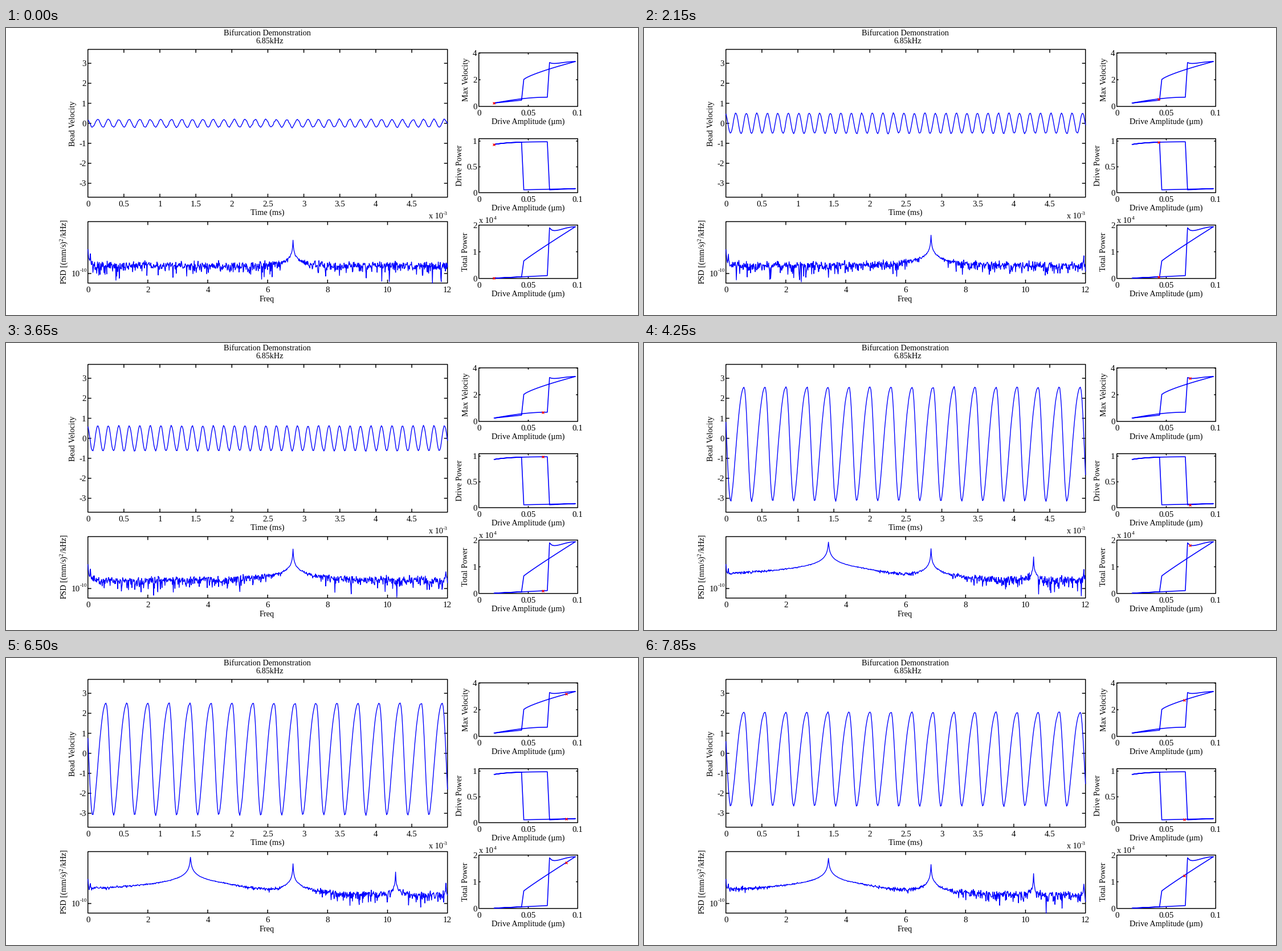
A matplotlib script for the animation above (8000 ms loop, 1109 by 505 pixels).

```python
import numpy as np
import matplotlib.pyplot as plt
from matplotlib.animation import FuncAnimation

W, H, DPI = 1109, 505, 100
PX = 72 / DPI
BLUE = "#0000ff"
LABEL, TICK, SUP = 14.3 * PX, 15 * PX, 9.5 * PX
STEP_MS, HOLD, STAY, FRAMES = 50, 10, 3, 160
TURN, STATES = 37, 74      # the drive rises up to TURN, then falls

plt.rcParams["font.family"] = "Liberation Serif"
plt.rcParams["mathtext.fontset"] = "custom"
plt.rcParams["mathtext.rm"] = "Liberation Serif"

fig = plt.figure(figsize=(W / DPI, H / DPI), dpi=DPI, facecolor="white")
ax = fig.add_axes([0, 0, 1, 1])
ax.set_xlim(0, W)
ax.set_ylim(H, 0)
ax.axis("off")


def stroke(x, y, color=BLUE, width=1.35, z=3):
    return ax.plot(x, y, color=color, lw=width * PX, zorder=z, snap=False,
                   solid_joinstyle="round", solid_capstyle="butt")[0]


def label(x, y, s, size=LABEL, ha="center", **kw):
    kw.setdefault("va", "baseline")
    ax.text(x, y, s, fontsize=size, ha=ha, **kw)


def upright(x, y, s):
    label(x, y, s, va="center", rotation=90)


def panel(left, right, top, bottom, xticks, yticks, size):
    """Box with inward ticks on all sides; a tick is a pixel and its text."""
    def edge(x, y):
        stroke(x, y, "black", 1.5, 2)

    edge([left, right, right, left, left], [top, top, bottom, bottom, top])
    for x, s in xticks:
        if left < x < right - 1:
            edge([x, x], [top, top + size])
            edge([x, x], [bottom, bottom - size])
        label(x, bottom + 16, s, TICK)
    for y, s in yticks:
        if top < y < bottom:
            edge([left, left + size], [y, y])
            edge([right, right - size], [y, y])
        label(left - 3, y + 5, s, TICK, "right")


# Main panels
X0, X1, MID, UNIT, KHZ = 143.7, 774.7, 167.7, 35.2, 52.58
panel(X0, X1, 37.6, 297.7,
      [(X0 + 63.15 * k, f"{k / 2:g}") for k in range(10)],
      [(MID - UNIT * v, str(v)) for v in range(-3, 4)], 6)
panel(X0, X1, 340.6, 448.8,
      [(X0 + KHZ * f, str(f)) for f in range(0, 13, 2)], [(432, "")], 6)
label(458.7, 13, "Bifurcation Demonstration")
label(462.5, 27, "6.85kHz")
label(459, 329, "Time (ms)")
label(458, 481, "Freq")
upright(117, 168, "Bead Velocity")
upright(102, 394, "PSD [(mm/s)$^2$/kHz]")
label(742, 335, "x 10", ha="left")
label(775, 329, "-3", SUP, "right")
label(129.5, 437, "10", TICK, "right")
label(142, 429, "-10", SUP, "right")

# Side panels: name, its x, pixel of zero, pixels per unit, top, tick step
SIDES = [("Max Velocity", 807.5, 138, 23.5, 43.7, 2),
         ("Drive Power", 796.5, 289.7, 90.7, 194.7, 0.5),
         ("Total Power", 806.5, 440.7, 47, 346.7, 1)]
for name, nx, zero, unit, top, step in SIDES:
    panel(829.7, 1003.2, top, zero,
          [(829.7 + 1735 * d, f"{d:g}") for d in (0, 0.05, 0.1)],
          [(zero - unit * step * k, f"{step * k:g}") for k in range(3)], 3)
    label(916, zero + 31, "Drive Amplitude (µm)")
    upright(nx, (top + zero) / 2, name)
label(830, 343, "x 10", ha="left")
label(856, 337, "4", SUP, "left")


def response(state):
    """Drive pixel, regime and the three side panel values of a state."""
    rising = state < TURN
    x = 855.8 + 3.92 * state if rising else 999.2 - 3.94 * (state - TURN)
    u = (x - 856) / 143
    onset = 0.68 if rising else 0.365
    high = u > onset - 0.01
    if not high:
        vel = 0.25 + (0.44 * np.sin(2.4 * u) if rising else 0.64 * u)
        return x, high, (vel, 0.989 - 0.055 * np.exp(-5 * u), 0.01 + 0.147 * u)
    g = np.clip((u - onset) / (1 - onset), 0, 1)
    drive = 0.055 + 0.023 * g
    if rising:
        swell, kick = np.sin(np.pi / 2 * g) ** 2, np.exp(-12 * g)
        return x, high, (3.19 + 0.17 * swell + 0.11 * kick, drive,
                         1.76 + 0.175 * swell + 0.155 * kick)
    return x, high, (2 + 1.36 * g ** 0.76, drive, 0.65 + 1.286 * g ** 0.95)


def side_y(values):
    return [side[2] - side[3] * v for side, v in zip(SIDES, values)]


path = [response(s) for s in range(STATES)]
for ys in zip(*(side_y(p[2]) for p in path)):
    stroke([p[0] for p in path], ys, width=1.6)

marks = [ax.plot([], [], "x", color="red", ms=4.8 * PX, mew=1.3 * PX, zorder=5)[0]
         for _ in SIDES]
wave = stroke([], [])
psd = stroke([], [])

T = np.linspace(X0, X1, 420)
F = np.linspace(X0, X1, 860)
DECADE, FLOOR = 10, 417.5      # pixels per decade of power, noise level


def velocity(vmax, high, rng):
    if high:
        # Doubled period: a slow rise, then a quick fall
        peak, trough, rise = vmax - 0.67, 0.08 - vmax, 0.64
        t = ((T - 152) / 36.88) % 1
        t = np.where(t < rise, (t / rise) ** 0.8, (1 - t) / (1 - rise))
        v = trough + (peak - trough) * (1 - np.cos(np.pi * t)) / 2
    else:
        v = (vmax - 0.055) * np.cos(2 * np.pi * (T - 142.6) / 18.44)
    return MID - UNIT * (v + rng.normal(0, 0.015, T.size))


def skirt(freq, top, width):
    center = F[np.argmin(abs(F - X0 - KHZ * freq))]
    return top + 10.5 * np.log10(1 + ((F - center) / width) ** 2)


def spectrum(vmax, high, state, rng):
    drop = 3.2 - vmax
    peaks = [skirt(0, 389, 0.25), skirt(0.09, 398, 0.2)]
    if high:
        fade = 0.07 * np.clip(F - 380, 0, None)
        peaks += [skirt(3.425, 350.5 + 4 * drop, 0.42) + fade,
                  skirt(6.85, 362 + 3 * drop, 0.22),
                  skirt(10.275, 376.5 + 6 * drop, 0.16)]
    else:
        peaks.append(skirt(6.85, 373 - 21 * np.log10((vmax - 0.055) / 0.2), 0.22))
    if state > 9:
        peaks.append(skirt(11.95, 397 if high else 401, 0.2))
    signal = np.sqrt(sum(10 ** ((FLOOR - p) / DECADE) for p in peaks))
    noise = rng.normal(0, 0.707, (2, F.size))
    power = (signal + noise[0]) ** 2 + noise[1] ** 2
    return np.minimum(FLOOR - DECADE * np.log10(power), 449)


def draw(i):
    state = 0 if i < HOLD else (i - HOLD) // STAY + 1
    rng = np.random.RandomState(40 + state)
    x, high, values = path[state]
    for mark, y in zip(marks, side_y(values)):
        mark.set_data([x], [y])
    wave.set_data(T, velocity(values[0], high, rng))
    psd.set_data(F, spectrum(values[0], high, state, rng))
    return [*marks, wave, psd]


anim = FuncAnimation(fig, draw, frames=FRAMES, interval=STEP_MS,
                     init_func=lambda: draw(0), repeat=True, repeat_delay=0)
plt.show()
```
